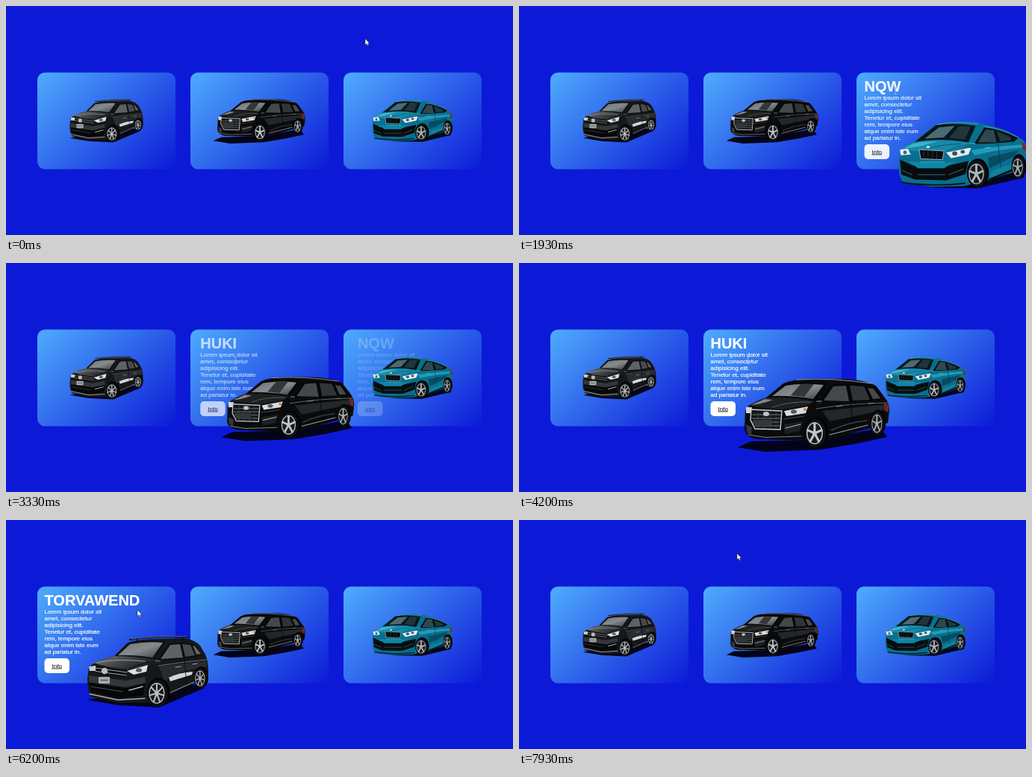
Write an HTML page that moves like this. It is 679 px wide and 308 px high and loops after 8 s.

```html
<!DOCTYPE html>
<html lang="en">
<head>
<meta charset="utf-8">
<title>Car cards</title>
<style>
  html, body { margin: 0; width: 100%; height: 100%; overflow: hidden; background: #0c1ad7; }
  svg { display: block; width: 679px; height: 308px; }
  text { font: 8px "Liberation Sans", Arial, sans-serif; fill: #fff; stroke: #fff; stroke-width: .2px; }
  .title { font-size: 20px; font-weight: bold; }
  .info { fill: #222; stroke: #222; stroke-width: .1px; text-decoration: underline; }
</style>
</head>
<body>
<svg id="stage" viewBox="0 0 679 308"></svg>
<script>
const LOOP = 8000, STEP = 1000 / 15, FADE = 1000, GROW = 0.65, DROP = 23, SHIFT = 12;

const LINES = ['Lorem ipsum dolor sit', 'amet, consectetur', 'adipisicing elit.',
  'Tenetur et, cupiditate', 'rem, tempore eius', 'atque enim iste eum', 'ad pariatur in.'];

const fill = (d, color) => `<path d="${d}" fill="${color}"/>`;
const line = (d, color, w = 1) =>
  `<path d="${d}" fill="none" stroke="${color}" stroke-width="${w}" stroke-linecap="round"/>`;
const oval = (x, y, rx, ry, color) =>
  `<ellipse cx="${x}" cy="${y}" rx="${rx}" ry="${ry}" fill="${color}"/>`;

function wheel(x, y, rx, ry, metal, spokes) {
  const hub = x - rx * 0.08;
  let s = oval(x + 1, y - 1.5, rx * 1.13, ry * 1.07, '#020304') + oval(x, y, rx, ry, '#101214')
    + oval(hub, y, rx * 0.78, ry * 0.78, metal) + oval(hub, y, rx * 0.68, ry * 0.7, '#17191b');
  for (let i = 0; i < spokes; i++) {
    const a = (i * 2 / spokes - 0.5) * Math.PI;
    const ex = hub + Math.cos(a) * rx * 0.7, ey = y + Math.sin(a) * ry * 0.7;
    s += line(`M${hub} ${y}L${ex.toFixed(1)} ${ey.toFixed(1)}`, metal, rx * 1.1 / spokes);
  }
  return s + oval(hub, y, rx * 0.2, ry * 0.2, metal);
}

const graySuv = () =>
  fill('M109 242L150 249 205 252 266 226 240 218Z', '#04051a') +
  fill('M145 183L163 165Q178 160 205 160L238 159Q253 161 260 169L267 181Q271 190 271 205L268 216 252 219 218 235 188 246 150 246 114 238Q109 232 109 214L111 198Q118 190 145 183Z', '#151719') +
  fill('M145 183L117 192Q137 199 165 201L196 194 201 188Q170 183 145 183Z', 'url(#hood)') +
  line('M122 192Q146 186 186 190', '#9a9ea0', 1) + line('M165 200Q180 193 199 190', '#0d0e0f', 1) +
  fill('M147 182L165 165Q187 161 214 163L198 187Q170 182 147 182Z', '#0e0f10') +
  fill('M150 182L166 167Q187 163 210 165L196 185Q170 181 150 182Z', 'url(#glass)') +
  fill('M203 189L219 166Q238 163 251 167L263 182Q240 187 203 189Z', '#0b0c0d') +
  fill('M207 187L220 168 233 167 237 185Z', '#5d6265') + fill('M240 184L236 167 247 168 253 182Z', '#474b4e') +
  fill('M255 181L250 169 253 170 261 180Z', '#606568') +
  line('M166 161Q200 156 244 157', '#0f1114', 2) + line('M168 160Q200 155.500 242 156.500', '#8b8f92', 0.7) +
  line('M174 164L176 160M237 161L238 157', '#0f1114', 1.6) +
  fill('M205 197L268 190 269 197 262 199Q228 203 212 217Z', '#292c2e') +
  line('M204 196Q236 191 268 188', '#6d7174', 1) +
  fill('M218 212Q232 205 250 204L249 208 220 217Z', '#d3d6d8') +
  line('M239 187L242 222', '#060707', 0.8) + line('M220 232L252 218', '#85898b', 1.2) +
  line('M227 198L234 197M250 194L256 193', '#a0a4a6', 1) +
  fill('M111 197L120 196 122 203 112 203Z', '#c5cace') +
  fill('M162 203L190 195 188 204 171 208Z', '#dde1e4') + oval(178, 202, 4, 2.8, '#565b5f') +
  fill('M120 197L162 203 160 211 120 206Z', '#090a0b') +
  line('M120 199L162 205M120 203.500L161 209', '#a8adb0', 1) +
  oval(132, 203, 4.2, 4.2, '#b7bcc1') +
  fill('M111 209L160 216 186 211 187 219 160 225 111 218Z', '#34373a') +
  fill('M112 219L160 226 186 220 184 236 150 240 114 231Z', '#060708') +
  line('M114 224L156 231', '#4b4f52', 1) + line('M112 234L150 242 186 240', '#a9adaf', 1.4) +
  line('M165 229L183 224', '#b4b8bb', 1.6) +
  '<rect x="124" y="211" width="15" height="9" rx="1" fill="#a7aaac"/>' +
  line('M127 215.5H136', '#55585b', 1.4) +
  oval(203, 191, 5, 3.5, '#1b1d1f') + line('M200 189.500H206', '#85898c', 0.9) +
  wheel(260.5, 213, 8.5, 13.5, '#b0b3b6', 7) + wheel(203, 233, 13.5, 18, '#babdc0', 7);

const blackSuv = () =>
  fill('M293 248L310 240 400 238 484 222 493 234 452 243 404 251 330 254Z', '#03041a') +
  fill('M331 181L354 162Q368 156 394 155.500L440 156Q465 158 478 165L490 181Q496 188 496 199L494 215 470 222 414 238 378 239 322 237Q304 236 302 224L303 198Q310 188 331 181Z', '#0a0b0c') +
  fill('M331 181L306 192Q330 196 353 197L388 191 396 186Q364 180 331 181Z', '#1d1f21') +
  fill('M329 183L311 191Q324 190 340 184Z', '#84888b') + line('M340 194Q360 186 390 187', '#5c6063', 1) +
  fill('M335 180L355 163Q378 158 413 162L397 185Q364 179 335 180Z', '#060707') +
  fill('M339 179L357 165Q378 161 408 164L394 183Q364 178 339 179Z', 'url(#glass)') +
  fill('M364 178L377 163 395 163 382 180Z', '#33373a') +
  fill('M403 187L419 164Q452 160 476 167L488 183Q448 188 403 187Z', '#050606') +
  fill('M408 185L421 166 438 165 442 186Z', '#43484b') + fill('M447 185L443 165 462 166 470 184Z', '#303437') +
  fill('M474 183L467 168 475 169 484 182Z', '#45494c') +
  line('M372 157Q420 154 472 162', '#a4a8ab', 0.9) +
  fill('M406 199L493 190 493 197 416 213Z', '#24272a') +
  line('M398 196Q440 189 494 188', '#64686b', 1.1) + line('M444 187L448 224', '#000', 0.8) +
  line('M425 193L433 192M468 189L475 188.500', '#8d9194', 1) +
  line('M418 225Q442 214 466 212', '#3b3e41', 1.6) + line('M416 231L467 218', '#9a9ea1', 1.2) +
  fill('M488 187L495 191 495 201 490 199Z', '#6d2526') +
  fill('M304 194L312 194 311 202 304 202Z', '#d0d5d8') +
  fill('M355 199L387 193 384 202 358 206Z', '#d8dcdf') + oval(368, 200, 4, 2.7, '#54595d') +
  oval(383, 197, 2.2, 2, '#d9803c') +
  fill('M311 197L352 199 350 224 316 223 310 211Z', '#141618') +
  line('M313 204H350M312 209H350M313 214H349M315 219H349', '#8d9194', 0.8) +
  line('M320 198V223M328 198V223M336 199V223M344 199V224', '#4a4d50', 0.7) +
  line('M311 197L352 199 350 224 316 223 310 211Z', '#c9cdd0', 1.4) +
  oval(331, 203, 4, 3, '#bfc3c6') +
  '<rect x="314" y="211" width="25" height="8" fill="#34373a"/>' +
  fill('M304 217L312 221 311 231 305 228Z', '#34373a') + fill('M355 217L380 213 376 226 356 230Z', '#1d2022') +
  line('M357 222L377 217', '#b3b7ba', 1.2) + line('M354 210L382 206', '#4a4e51', 1) +
  line('M307 231L330 234.500 378 233', '#7d8184', 1.2) +
  oval(402, 188, 5, 4, '#0f1112') + line('M399 186H405', '#93979a', 1) +
  wheel(480, 216, 9, 16, '#aaadb0', 5) + wheel(397, 229, 14, 19, '#c2c5c8', 5);

const tealCoupe = () =>
  fill('M512 241L560 248 620 249 684 234 684 218Z', '#04061f') +
  fill('M530 185L560 161Q576 156 598 156Q630 157 660 169L682 181Q688 186 687 199L685 224 668 227 634 238 600 246 556 247 517 242Q510 234 510 217L512 198Q517 190 530 185Z', '#0a6f8e') +
  fill('M530 185L513 194Q540 200 576 198L606 190 612 185Q568 179 530 185Z', '#1689a9') +
  fill('M530 187L518 193Q533 193 548 188L564 184Q546 183 530 187Z', '#42b3cb') +
  line('M548 195Q566 188 596 187M576 197Q592 190 608 188', '#0a5872', 1) +
  fill('M533 184L562 161Q586 157 617 162L607 185Q570 178 533 184Z', '#08161c') +
  fill('M546 180L566 164 588 162 573 178Z', '#4d6a74') + fill('M580 179L594 162 610 163 602 181Z', '#22343c') +
  line('M564 160Q590 155 620 159', '#3fa9c1', 1.1) +
  fill('M615 187L629 164Q652 166 676 179L670 184Q640 187 615 187Z', '#061319') +
  fill('M620 185L631 167 642 168 646 185Z', '#30474f') + fill('M651 184L646 169 666 178 666 182Z', '#23383f') +
  line('M629 163Q652 165 676 178', '#53a9bd', 0.9) +
  fill('M634 206L676 196 672 204 636 221Z', '#074c63') +
  fill('M610 196Q645 190 686 188L685 192Q640 196 616 203Z', '#239ab6') +
  line('M648 187L652 222', '#04394c', 0.9) + line('M630 193L637 192', '#6bc1d2', 1) +
  fill('M638 226Q652 219 666 216L667 222 637 235Z', '#118099') + line('M636 237L667 224', '#04151c', 3) +
  fill('M681 184L687 190 687 197 682 194Z', '#7a2a33') +
  fill('M512 195L523 194 527 202 513 203Z', '#e2edf1') + oval(519, 199, 2.5, 2.5, '#4b6570') +
  fill('M576 199L611 192 607 202 583 207Z', '#e2edf1') + oval(588, 200.5, 3.6, 3, '#3c545e') +
  oval(599, 198, 3, 2.6, '#3c545e') +
  fill('M539 195L573 197 571 209 541 208Z', '#070c0f') + line('M539 195L573 197 571 209 541 208Z', '#a9bcc3', 0.9) +
  line('M545 197V207M551 197V207M557 197V207M563 198V208', '#33444b', 0.8) +
  oval(551, 191.5, 2.4, 1.8, '#d5dfe3') +
  fill('M512 209L529 217 576 218 607 211 603 229 576 238 533 237 514 230Z', '#060d11') +
  fill('M523 211L538 213 578 213 590 211 573 221 537 221Z', '#0d86a7') +
  line('M540 212.500H574', '#49b5cc', 0.9) +
  line('M515 224L529 230M537 230H574M580 230L600 222', '#4d666f', 1) +
  fill('M515 234L533 239 576 240 603 232 602 240 556 244 517 240Z', '#0b6d8a') +
  line('M516 241Q556 247 602 242', '#06161c', 2) +
  oval(612, 189, 6, 4.2, '#0c6d8a') + line('M608 187Q612 185 616 187', '#4bb7ce', 1) +
  wheel(676, 220, 9, 16, '#a1aaae', 5) + wheel(619, 229, 13.5, 18.5, '#aeb6ba', 5);

// left: card edge, rest/big: centre of the car at each size, on/off: hover span
const CARDS = [
  { left: 42, name: 'TORVAWEND', draw: graySuv, rest: [134.5, 154.5], big: [190, 204], on: 4530, off: 6850 },
  { left: 247, name: 'HUKI', draw: blackSuv, rest: [339.5, 155], big: [395, 204.5], on: 2930, off: 4500 },
  { left: 452, name: 'NQW', draw: tealCoupe, rest: [544.5, 154.5], big: [599, 202.5], on: 1290, off: 2850 }
];

// time, x, y
const POINTER = [
  [0, 481, 44], [66, 481, 44], [66.5, 443, 45], [934, 443, 45], [1000, 454, 60], [1134, 476, 89],
  [1270, 500, 104], [1530, 505, 112], [2670, 503, 118], [2870, 448, 122], [2934, 426, 124],
  [3130, 307, 131], [4330, 307, 131], [4500, 246, 125], [4670, 177, 121], [6200, 176, 121],
  [6670, 178, 116], [6870, 188, 87], [7000, 212, 65], [7200, 262, 53], [7530, 285, 48],
  [7934, 292, 45], [8000, 292, 45]
];

const copy = c => `<g class="copy">
  <text class="title" x="${c.left + 9.5}" y="115.300">${c.name}</text>
  ${LINES.map((s, i) => `<text x="${c.left + 9.5}" y="${125.7 + i * 9}">${s}</text>`).join('')}
  <rect x="${c.left + 9.5}" y="186" width="33.5" height="20" rx="5" fill="#fff"/>
  <text class="info" x="${c.left + 19.5}" y="198.500">Info</text></g>`;

const stage = document.getElementById('stage');
stage.innerHTML = `<defs>
  <linearGradient id="panel" gradientUnits="userSpaceOnUse" x1="13.75" y1="-13.75" x2="171.25" y2="143.75">
    <stop stop-color="#4facfe"/><stop offset="1" stop-color="#0c1ad7"/></linearGradient>
  <linearGradient id="glass" x2="1" y2="1">
    <stop stop-color="#6b7174"/><stop offset=".5" stop-color="#858b8e"/><stop offset="1" stop-color="#3a3e42"/></linearGradient>
  <linearGradient id="hood" x2="1" y2=".4">
    <stop stop-color="#77797b"/><stop offset=".6" stop-color="#3c3f41"/><stop offset="1" stop-color="#1d1f20"/></linearGradient>
  </defs>` +
  CARDS.map(c => `<rect transform="translate(${c.left} 89.5)" width="185" height="130" rx="10" fill="url(#panel)"/>`).join('') +
  CARDS.map(copy).join('') +
  CARDS.map(c => `<g class="car">${c.draw()}</g>`).join('') +
  `<g id="pointer">
    <path id="arrow" d="M0 0V8.4L1.9 6.7 3.3 9.6 4.7 9 3.4 6.2H6Z" fill="#fff" stroke="#111" stroke-width=".5"/>
    <path id="beam" d="M-1.5-4.500H1.500M0-4.500V4.500M-1.500 4.500H1.500" fill="none" stroke="#9fb8e8" stroke-width=".8"/>
  </g>`;

const copies = stage.querySelectorAll('.copy');
const cars = stage.querySelectorAll('.car');
const [pointer, arrow, beam] = ['pointer', 'arrow', 'beam'].map(id => document.getElementById(id));

// cubic-bezier(.25, .1, .25, 1)
function ease(x) {
  if (x <= 0) return 0;
  if (x >= 1) return 1;
  const curve = (a, b, u) => 3 * a * u * (1 - u) ** 2 + 3 * b * u * u * (1 - u) + u ** 3;
  let lo = 0, hi = 1;
  for (let i = 0; i < 24; i++) {
    const mid = (lo + hi) / 2;
    if (curve(0.25, 0.25, mid) < x) lo = mid; else hi = mid;
  }
  return curve(0.1, 1, lo);
}

function pointerAt(t) {
  const i = Math.max(1, POINTER.findIndex(k => k[0] >= t));
  const [t0, x0, y0] = POINTER[i - 1], [t1, x1, y1] = POINTER[i];
  const u = (t - t0) / (t1 - t0);
  return [x0 + (x1 - x0) * u, y0 + (y1 - y0) * u];
}

function render(t) {
  CARDS.forEach((c, i) => {
    const grown = ease((t - c.on) / FADE);
    const shown = t < c.off ? grown : 1 - ease((t - c.off) / FADE);
    copies[i].setAttribute('opacity', shown);
    copies[i].setAttribute('transform', `translate(${SHIFT * (1 - shown)} 0)`);

    // the car drops at once on hover, grows, and snaps back when left
    const hover = t >= c.on && t < c.off;
    const p = hover ? grown : 0, drop = hover ? DROP : 0;
    const x = c.rest[0] + (c.big[0] - c.rest[0]) * p;
    const y = c.rest[1] + drop + (c.big[1] - c.rest[1] - drop) * p;
    const size = (1 + GROW * p) / (1 + GROW);
    cars[i].setAttribute('transform',
      `translate(${x} ${y}) scale(${size}) translate(${-c.big[0]} ${-c.big[1]})`);
  });

  // text turns the arrow into a beam
  const [px, py] = pointerAt(t);
  const overText = py > 98 && CARDS.some(c => px > c.left + 9 && px < c.left + 88);
  pointer.setAttribute('transform', `translate(${px} ${py})`);
  arrow.setAttribute('opacity', overText ? 0 : 1);
  beam.setAttribute('opacity', overText ? 1 : 0);
}

const start = performance.now();
function tick() {
  const t = (performance.now() - start) % LOOP;
  render(Math.min(LOOP - STEP, Math.floor((t + 4) / STEP) * STEP));
  requestAnimationFrame(tick);
}
tick();
</script>
</body>
</html>
```
